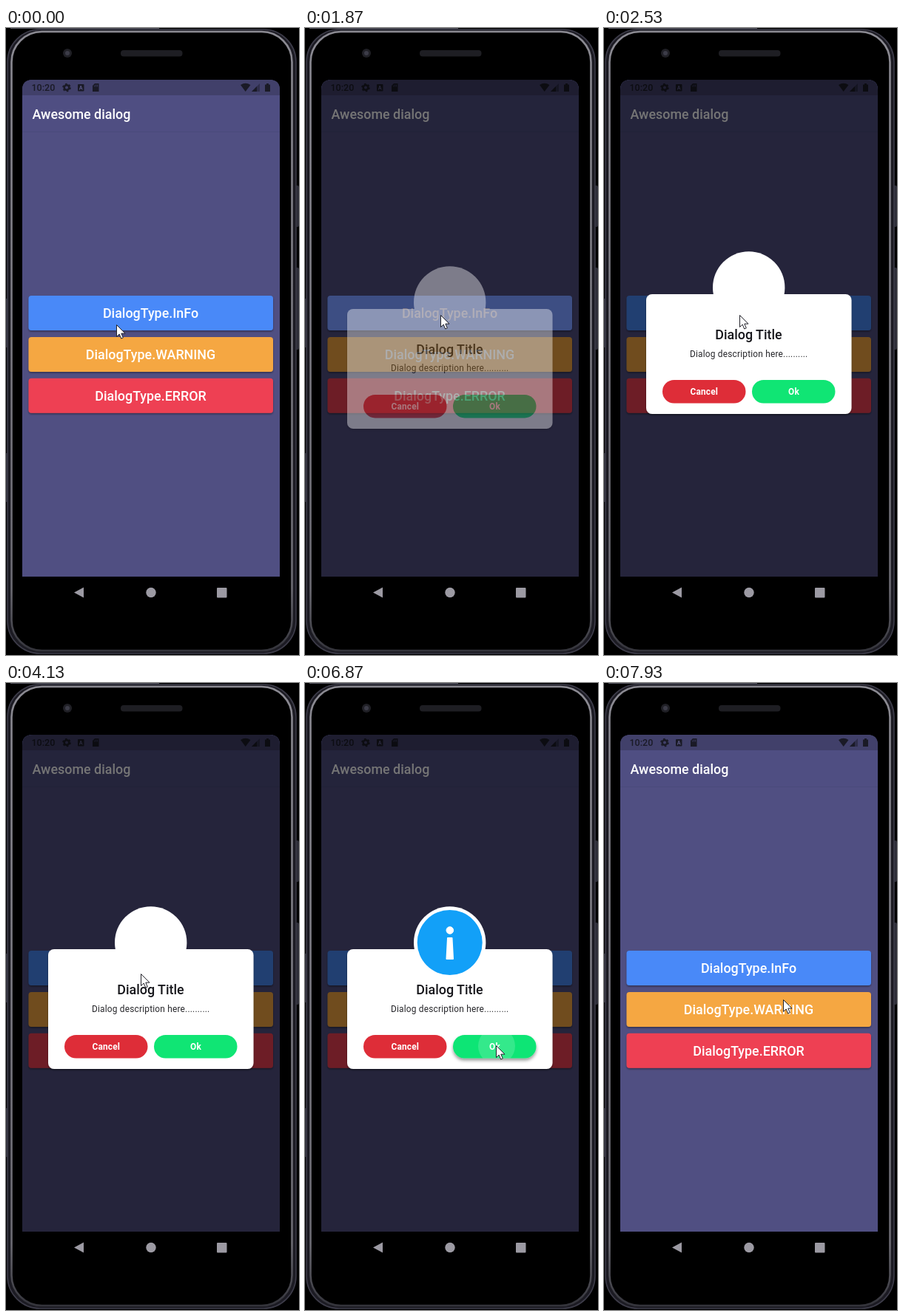
Recreate the animation shown at these times as an HTML page. Size 396x848 px, loop 8000 ms.

```html
<!DOCTYPE html>
<html lang="en">
<head>
<meta charset="utf-8">
<title>Dialog demo</title>
<style>
  html, body { margin: 0; width: 100%; height: 100%; overflow: hidden; background: #000; }
  svg { display: block; width: 396px; height: 848px; }
  text { font-family: Roboto, "Open Sans", sans-serif; fill: #fff; }
  .big { font-size: 17.9px; font-weight: 500; }
  .mid { text-anchor: middle; }
  .small { font-size: 11.86px; letter-spacing: .21px; }
  .bold { font-weight: 700; }
</style>
</head>
<body>
<svg viewBox="0 0 396 848">
  <defs>
    <clipPath id="screenClip"><path d="M22 742V84Q22 70 36 70H356Q370 70 370 84V742Z"/></clipPath>
    <clipPath id="okClip"><rect x="200" y="476" width="112.5" height="31.5" rx="15.75"/></clipPath>
    <linearGradient id="metal" x1="0" y1="0" x2="0" y2="1">
      <stop offset="0" stop-color="#8b8a92"/>
      <stop offset=".9" stop-color="#6c6b73"/>
      <stop offset="1" stop-color="#34343b"/>
    </linearGradient>
    <filter id="lift" x="-10%" y="-30%" width="120%" height="180%">
      <feDropShadow dx="0" dy="1.5" stdDeviation="1.2" flood-opacity=".4"/>
    </filter>
    <filter id="press" x="-10%" y="-30%" width="120%" height="180%">
      <feDropShadow dx="0" dy="3" stdDeviation="2" flood-opacity=".4"/>
    </filter>
  </defs>

  <!-- phone body -->
  <rect width="396" height="848"/>
  <path d="M6 .5H207" stroke="#55555f"/>
  <g fill="#2e2e38">
    <rect x="391" y="213" width="5" height="56" rx="2"/>
    <rect x="391" y="324" width="5" height="111" rx="2"/>
    <rect x="0" y="366" width="2" height="66"/>
    <rect x="0" y="575" width="2" height="66"/>
  </g>
  <rect x="2" y="2" width="390" height="844" rx="44" fill="#1c1b23" stroke="#3d3c49" stroke-width="1.6"/>
  <rect x="7.500" y="5" width="379" height="837" rx="41" stroke="url(#metal)" stroke-width="2.600"/>
  <circle cx="83" cy="34" r="6" fill="#202026"/>
  <circle cx="83" cy="34" r="3" fill="#3c3c48"/>
  <rect x="155" y="30" width="83.500" height="8.500" rx="4" fill="#1e1e23"/>
  <g fill="#9c9aa3">
    <path d="M92 763.500L105 756.500V770.500Z"/>
    <circle cx="196" cy="763.500" r="6.700"/>
    <rect x="285" y="757" width="13.500" height="13.500" rx="1"/>
  </g>

  <!-- app screen -->
  <g clip-path="url(#screenClip)">
    <rect x="22" y="70" width="348" height="672" fill="#504f82"/>
    <rect x="22" y="91" width="348" height="49" fill="#4f4e82"/>
    <path d="M22 140.500H370" stroke="#494a7b"/>
    <rect x="22" y="70" width="348" height="21" fill="#41406a"/>
    <g fill="#1a1a26">
      <text x="34.500" y="85" style="font-size:12.500px;font-weight:500;fill:#1a1a26">10:20</text>
      <circle cx="82" cy="80.500" r="3.300" fill="none" stroke="#1a1a26" stroke-width="2.600"/>
      <circle cx="82" cy="80.500" r="5" fill="none" stroke="#1a1a26" stroke-width="1.600" stroke-dasharray="2.600 2.636"/>
      <rect x="97" y="76" width="8.500" height="9.500" rx="1"/>
      <path d="M99.300 83.500L101.200 78L103.200 83.500M100 81.800H102.500" fill="none" stroke="#5a5987" stroke-width="1"/>
      <path d="M120 75H125.500V86H117V78Z"/>
      <path d="M119.500 77.500V79.500M121.500 76.500V79.500M123.500 76.500V79.500" stroke="#41406a" stroke-width=".8"/>
      <path d="M317 77Q323.500 72.500 330.500 77L323.700 86Z"/>
      <path d="M343 75V86H332Z" opacity=".45"/>
      <path d="M339 79V86H332Z"/>
      <path d="M350 76.500H352V75H355V76.500H357V86H350Z"/>
    </g>
    <text class="big" x="35.500" y="122.500">Awesome dialog</text>
    <g id="buttons"></g>
    <rect id="barrier" x="22" y="70" width="348" height="672" opacity="0"/>
    <rect id="tapGlow" x="30.500" y="362" width="330.500" height="47" rx="4" fill="#8c78b4" opacity="0"/>
  </g>

  <g id="dialog">
    <rect x="57" y="360" width="277.500" height="162" rx="8" fill="#fff" filter="url(#lift)"/>
    <circle cx="195.700" cy="351" r="48.700" fill="#fff"/>
    <circle id="disc" cx="195.700" cy="351" r="44" fill="#12a0f8"/>
    <g id="mark" fill="#fff" stroke="#fff" stroke-linejoin="round">
      <circle cx="195.800" cy="334.500" r="4.800"/>
      <path d="M193 345H198.500L200 373H191.500Z" stroke-width="2"/>
    </g>
    <text class="big mid" x="195.500" y="421" style="fill:#17171c">Dialog Title</text>
    <text class="small mid" x="195.700" y="444.500" style="fill:#26262a">Dialog description here..........</text>
    <rect x="79" y="476" width="112.500" height="31.500" rx="15.75" fill="#de2d38"/>
    <rect id="ok" x="200" y="476" width="112.500" height="31.500" rx="15.75" fill="#10e574"/>
    <text class="small bold mid" x="135.300" y="496">Cancel</text>
    <text class="small bold mid" x="256.500" y="496">Ok</text>
    <circle id="ripple" cx="259" cy="491" fill="#fff" opacity=".16" clip-path="url(#okClip)"/>
  </g>

  <path id="cursor" d="M.5 .5V16.500L4.200 13L6.700 19L9.300 17.900L6.800 12.100H12Z" fill="#fff" stroke="#22222a" stroke-width="1"/>
</svg>

<script>
const $ = id => document.getElementById(id);
const LOOP = 8000;

[["InFo", 362, "#4889f8"], ["WARNING", 418, "#f5a742"], ["ERROR", 473.7, "#ee4052"]].forEach(([name, y, color]) => {
  $("buttons").innerHTML +=
    `<rect x="30.5" y="${y}" width="330.5" height="47" rx="4" fill="${color}" filter="url(#lift)"/>
     <text class="big mid" x="195.500" y="${y + 30}">DialogType.${name}</text>`;
});

// Cursor tip: time, x, y
const path = [
  [0, 149, 401], [340, 149, 401], [730, 164, 389], [940, 164, 389], [1070, 183, 388],
  [4060, 183, 388], [4130, 182, 393], [4930, 200, 446], [5470, 214, 480],
  [5800, 243, 488], [6070, 258, 490], [7410, 258, 490], [7930, 242, 428], [LOOP, 242, 428]
];

const ramp = (t, from, to) => Math.min(1, Math.max(0, (t - from) / (to - from)));
const easeOut = k => 1 - (1 - k) ** 2;

function cursorAt(t) {
  const i = path.findIndex(p => p[0] > t);
  const [a, b] = [path[i - 1], path[i]];
  const k = ramp(t, a[0], b[0]);
  return [a[1] + (b[1] - a[1]) * k, a[2] + (b[2] - a[2]) * k];
}

function scaleAbout(el, x, y, k) {
  el.setAttribute("transform", `translate(${x} ${y}) scale(${k}) translate(${-x} ${-y})`);
}

function draw(t) {
  const open = easeOut(ramp(t, 1870, 2200));
  const close = ramp(t, 6880, 7070);
  const shown = t >= 1870 && close < 1;
  $("barrier").setAttribute("opacity", shown ? 0.54 * (1 - close) : 0);
  $("tapGlow").setAttribute("opacity", shown ? 0.27 * (1 - open) : 0);
  $("dialog").setAttribute("opacity", shown ? (0.4 + 0.6 * open) * (1 - close) : 0);
  $("dialog").setAttribute("transform", `translate(0 ${20 * (1 - open) + 30 * close})`);

  scaleAbout($("disc"), 195.7, 351, easeOut(ramp(t, 4180, 4560)));
  scaleAbout($("mark"), 195.7, 351, easeOut(ramp(t, 4500, 4900)));

  const pressed = t >= 6800 && shown;
  $("ripple").setAttribute("r", pressed ? 10 + 15 * ramp(t, 6800, 6870) + 30 * close : 0);
  $("ok").setAttribute("filter", pressed ? "url(#press)" : "none");
  $("cursor").setAttribute("transform", `translate(${cursorAt(t)})`);
}

const start = performance.now();
function tick() {
  draw((performance.now() - start) % LOOP);
  requestAnimationFrame(tick);
}
tick();
</script>
</body>
</html>
```
